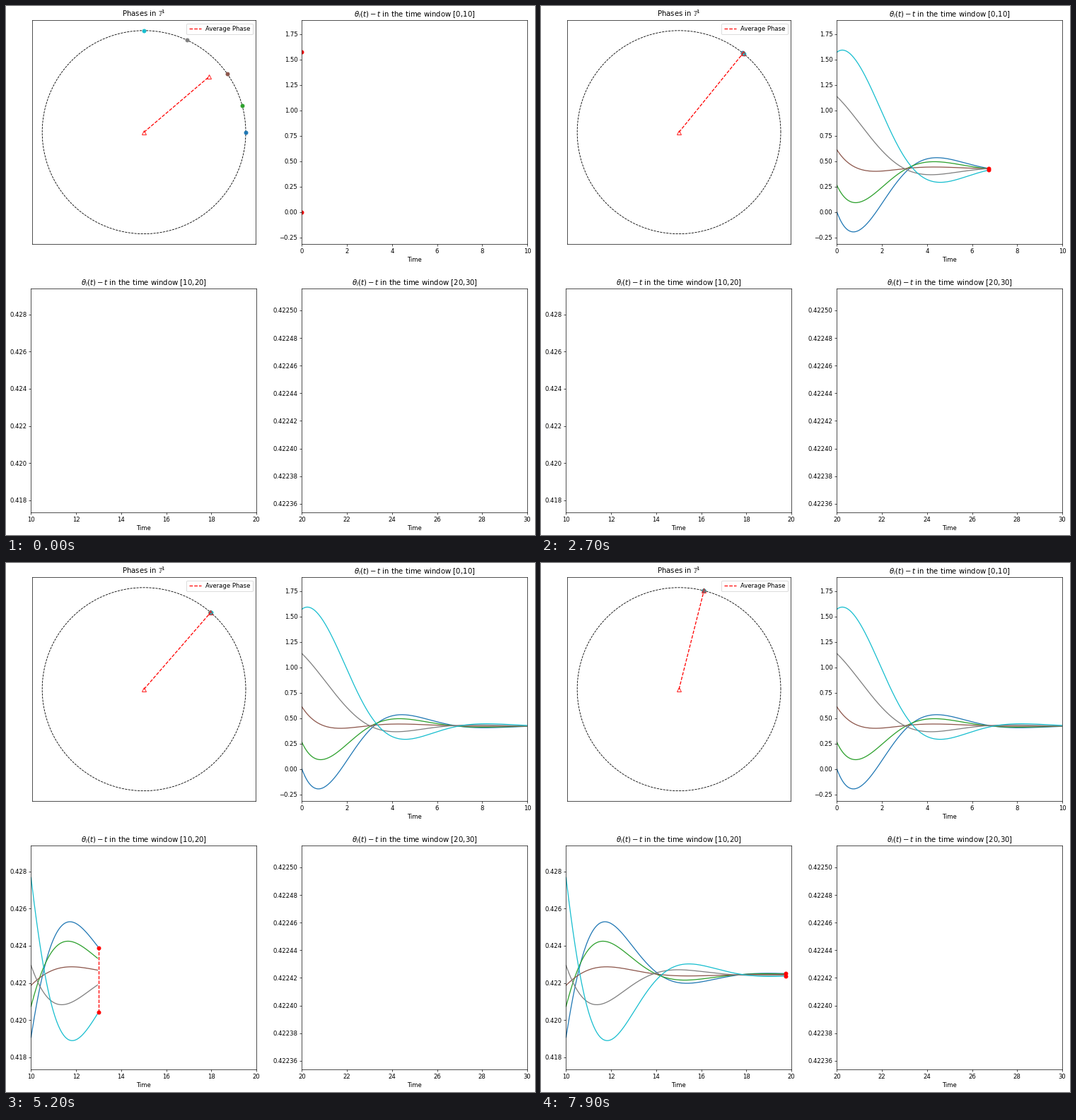
Write a matplotlib script that moves like this. It is 748 px wide and 749 px high and loops after 8000 ms.

```python
import numpy as np
import matplotlib.pyplot as plt
from matplotlib.animation import FuncAnimation

W, H, DPI = 748, 749, 61
FRAMES, INTERVAL = 80, 100
DT, SUB = 0.05, 5          # integration step, steps per frame
COLORS = ["tab:blue", "tab:green", "tab:brown", "tab:gray", "tab:cyan"]


def accel(phi, vel):
    """Identical oscillators with inertia, seen in the rotating frame."""
    return -vel + np.sin(phi[None, :] - phi[:, None]).mean(axis=1)


def simulate(phi, vel, steps):
    """Classic RK4; returns the phases at every step."""
    def deriv(s):
        return np.array([s[1], accel(s[0], s[1])])

    state, path = np.array([phi, vel]), [phi]
    for _ in range(steps):
        k1 = deriv(state)
        k2 = deriv(state + DT / 2 * k1)
        k3 = deriv(state + DT / 2 * k2)
        k4 = deriv(state + DT * k3)
        state = state + DT / 6 * (k1 + 2 * k2 + 2 * k3 + k4)
        path.append(state[0])
    return np.array(path)


phi0 = np.radians([0, 15, 35, 65, 90])
vel0 = np.radians([22.5, 30, 37.5, 45, 67.5]) - 1
PHI = simulate(phi0, vel0, FRAMES * SUB)
T = np.arange(len(PHI)) * DT

# The tiny surplus keeps the pixel size from being truncated downwards
fig = plt.figure(figsize=((W + 1e-6) / DPI, (H + 1e-6) / DPI), dpi=DPI,
                 facecolor="white")


def add_axes(left, top, width, height):
    return fig.add_axes([left / W, 1 - (top + height) / H, width / W, height / H])


# Phases on the circle
circle = add_axes(36.8, 20.4, 316.6, 316.6)
circle.set(xlim=(-1.1, 1.1), ylim=(-1.1, 1.1), xticks=[], yticks=[])
circle.set_title(r"Phases in $\mathbb{T}^1$")
arc = np.linspace(0, 2 * np.pi, 400)
circle.plot(np.cos(arc), np.sin(arc), "k--", lw=1)
dots = [circle.plot([], [], "o", color=c)[0] for c in COLORS]
mean_line, = circle.plot([], [], "r--", label="Average Phase")
mean_ends, = circle.plot([], [], "r^", mfc="none")
circle.legend(loc="upper right")


class Window:
    """Phase curves over one stretch of ten time units."""

    def __init__(self, left, top, start, ylim):
        self.start = start
        ax = add_axes(left, top, 318.6, 316.5)
        ax.set(xlim=(start, start + 10), ylim=ylim, xlabel="Time")
        ax.set_title(rf"$\theta_i(t)-t$ in the time window [{start},{start + 10}]")
        ax.ticklabel_format(axis="y", useOffset=False)
        self.curves = [ax.plot([], [], color=c)[0] for c in COLORS]
        self.span, = ax.plot([], [], "r--")
        self.ends, = ax.plot([], [], "ro")

    def draw(self, n):
        first = round(self.start / DT)
        last = min(n, first + round(10 / DT) + 1)
        part = slice(first, max(first, last))
        for curve, y in zip(self.curves, PHI.T):
            curve.set_data(T[part], y[part])
        active = self.start <= T[n] + 1e-9 < self.start + 10
        x = [T[n]] * 2 if active else []
        y = [PHI[n].min(), PHI[n].max()] if active else []
        self.span.set_data(x if n else [], y if n else [])
        self.ends.set_data(x, y)


windows = [
    Window(418.4, 20.4, 0, (-0.3146, 1.8833)),
    Window(35.4, 400.4, 10, (0.417341, 0.42939)),
    Window(418.4, 400.4, 20, (0.4223538, 0.4225156)),
]


def update(k):
    n = k * SUB
    z = np.exp(1j * (PHI[n] + T[n]))
    for dot, p in zip(dots, z):
        dot.set_data([p.real], [p.imag])
    m = z.mean()
    for line in (mean_line, mean_ends):
        line.set_data([0, m.real], [0, m.imag])
    for win in windows:
        win.draw(n)
    return []


anim = FuncAnimation(fig, update, frames=FRAMES, interval=INTERVAL,
                     repeat=True, repeat_delay=0, blit=False)
plt.show()
```
